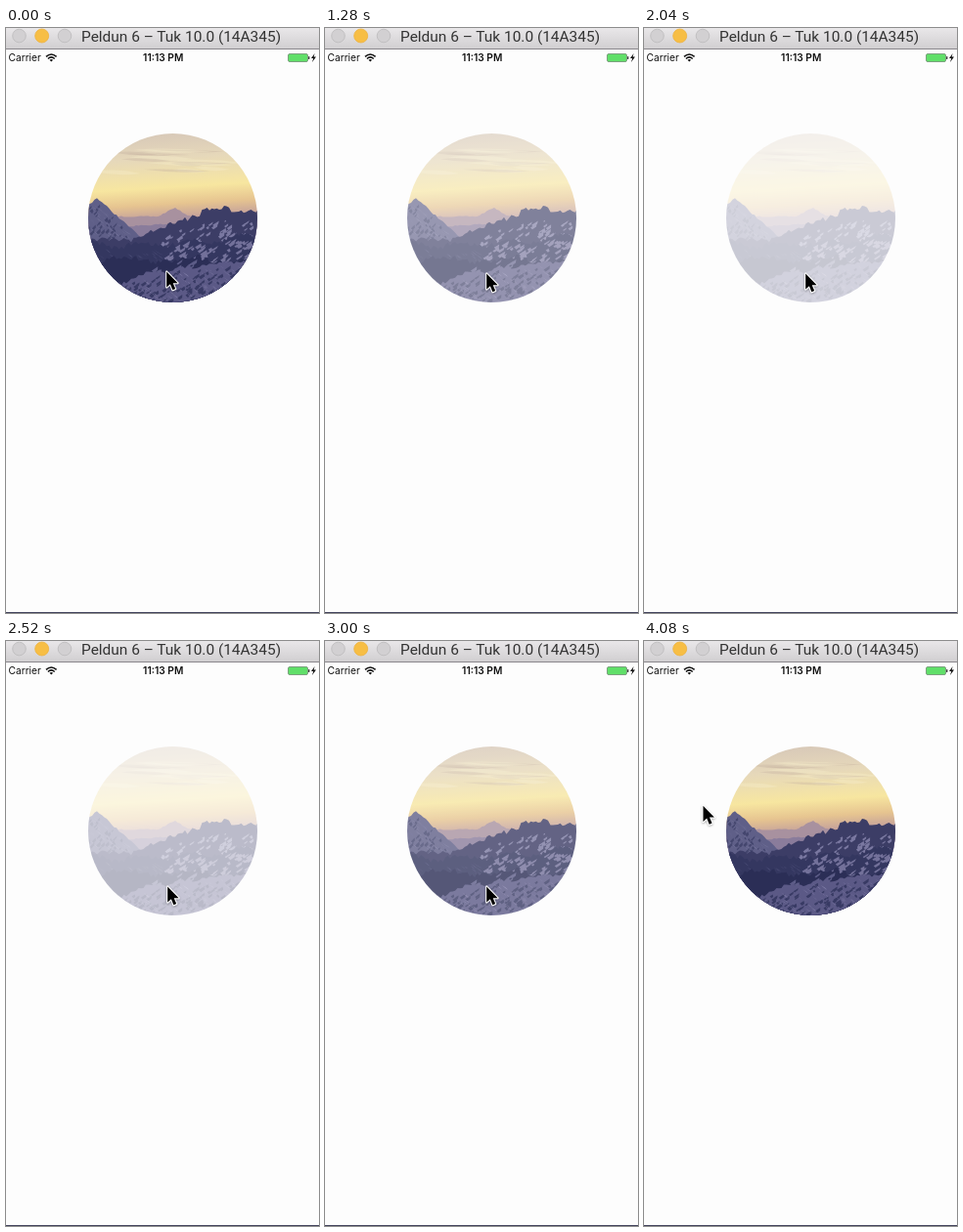
Write an HTML page that moves like this. It is 320x599 px and loops after 4.12 s.

```html
<!DOCTYPE html>
<html lang="en">
<head>
<meta charset="utf-8">
<title>Fading picture</title>
<style>
  html, body { margin: 0; width: 100%; height: 100%; overflow: hidden; background: #fdfdfd; }
  svg { display: block; width: 100%; height: 100%; }
  .title { font: 15.45px Roboto, sans-serif; fill: #333; }
  .status { font: 10.2px Inter, sans-serif; fill: #111; }
  .clock { font-weight: 600; }
</style>
</head>
<body>
<svg viewBox="0 0 320 599" preserveAspectRatio="none">
  <defs>
    <linearGradient id="bar" x2="0" y2="1">
      <stop stop-color="#e9e7e9"/><stop offset="1" stop-color="#d1cfd1"/>
    </linearGradient>
    <linearGradient id="sky" gradientUnits="userSpaceOnUse" x1="166" y1="108" x2="172" y2="208">
      <stop stop-color="#d8c9b8"/>
      <stop offset=".25" stop-color="#e6d8ba"/>
      <stop offset=".55" stop-color="#f7e6a0"/>
      <stop offset=".72" stop-color="#e6c490"/>
      <stop offset=".85" stop-color="#c8a59a"/>
      <stop offset="1" stop-color="#9c8ba3"/>
    </linearGradient>
    <clipPath id="round"><circle cx="170.5" cy="194.5" r="86.5"/></clipPath>
    <filter id="shadow" x="-50%" y="-30%" width="200%" height="170%">
      <feDropShadow dx="0" dy="1" stdDeviation="1" flood-opacity=".35"/>
    </filter>
  </defs>

  <rect width="320" height="599" fill="#fdfdfd"/>
  <rect width="320" height="21" fill="url(#bar)"/>
  <rect y="21" width="320" height="1" fill="#8a878c"/>
  <rect y="598" width="320" height="1" fill="#45465f"/>
  <g fill="#d2d0d2" stroke="#bcbabc" stroke-width=".8">
    <circle cx="13.5" cy="8" r="6.8"/>
    <circle cx="36.7" cy="8" r="7" fill="#f7be45" stroke="#eeb341"/>
    <circle cx="60" cy="8" r="6.8"/>
  </g>
  <text class="title" x="77" y="14">Peldun 6 – Tuk 10.0 (14A345)</text>

  <text class="status" x="2.5" y="34">Carrier</text>
  <g fill="none" stroke="#111" stroke-width="1.6">
    <path d="M41 29.4Q46.3 24.6 51.6 29.4M42.9 31.5Q46.3 28.4 49.7 31.5"/>
    <path d="M46.3 34.6L44.5 32.7Q46.3 31.2 48.1 32.7Z" fill="#111" stroke="none"/>
  </g>
  <text class="status clock" x="160.7" y="34" text-anchor="middle">11:13 PM</text>
  <rect x="288.5" y="26.5" width="20" height="8" rx="1.5" fill="#60df69" stroke="#6f8f72" stroke-width=".8"/>
  <rect x="309" y="29" width="1.4" height="3" rx=".6" fill="#444"/>
  <path d="M315.6 26L312 31H314.2L313 35L317 29.6H314.6Z" fill="#111"/>

  <g id="photo" clip-path="url(#round)">
    <rect x="83" y="107" width="175" height="175" fill="url(#sky)"/>
  </g>

  <path id="cursor" d="M0 0V16.2L3.7 12.8L6.2 18.9L9 17.7L6.5 11.8H11.4Z"
        stroke="#fff" stroke-width="2" stroke-linejoin="round" paint-order="stroke" filter="url(#shadow)"/>
</svg>
<script>
const LOOP = 4120, STEP = 40;
const LEFT = 83, RIGHT = 258, BOTTOM = 285;
const photo = document.getElementById('photo');
const cursor = document.getElementById('cursor');

let seed = 7;
const random = () => (seed = seed * 16807 % 2147483647) / 2147483647;
const between = (low, high) => low + (high - low) * random();
const clamp = v => Math.min(1, Math.max(0, v));
const peak = (x, center, height, slope) => Math.max(0, height - Math.abs(x - center) * slope);

function addPath(d, fill, opacity = 1) {
  const path = document.createElementNS('http://www.w3.org/2000/svg', 'path');
  path.setAttribute('d', d);
  path.setAttribute('fill', fill);
  path.setAttribute('opacity', opacity);
  photo.append(path);
}

// Land below the height top(x), with a jagged edge.
function ridge(top, roughness, fill) {
  let d = `M${LEFT} ${BOTTOM}`;
  for (let x = LEFT; x <= RIGHT; x += 2.5) d += `L${x} ${top(x) + between(-roughness, roughness)}`;
  addPath(`${d}V${BOTTOM}Z`, fill);
}

// Small slanted streaks of snow or rock below top(x).
function streaks(count, from, to, top, depth, slant, fill) {
  let d = '';
  for (let i = 0; i < count; i++) {
    const x = between(from, to), y = top(x) + between(2, depth);
    const length = between(2, 8), width = between(.8, 2.4);
    d += `M${x} ${y}l${length * slant} ${length * .6}l${width} ${width}l${-length * slant * .6} ${-length * .4}Z`;
  }
  addPath(d, fill, .75);
}

// Thin clouds, faint and nearly level.
for (let i = 0; i < 16; i++) {
  const x = between(90, 200), y = between(112, 150), width = between(30, 90);
  addPath(`M${x} ${y}q${width / 2} ${between(-5, 1)} ${width} 2q${-width / 2} ${between(1, 4)} ${-width} -2`,
    i % 2 ? '#c4ae9f' : '#f7edcc', .35);
}

const haze = x => 193 - peak(x, 172, 9, .55);
const leftPeak = x => 215 - peak(x, 93, 41, x < 93 ? .8 : .9);
const rightRange = x => 216 - clamp((x - 128) / 75) * 28
  - peak(x, 207, 4, .5) - peak(x, 223, 5, .6) + Math.sin(x * .55) * 1.5;
const darkSlope = x => 222 - clamp((x - 150) / 100) * 8 + Math.sin(x / 8) * 3;
const valley = x => 237 + Math.sin(x / 11) * 3;
const foreground = x => 262 - clamp((x - 115) / 35) * 12 - clamp((x - 150) / 100) * 13 + Math.sin(x / 6);

ridge(haze, .6, '#a8919f');
ridge(x => 202 + Math.sin(x / 15), .8, '#8a7c9b');

ridge(leftPeak, 1, '#5f5f88');
streaks(60, 84, 128, leftPeak, 32, .8, '#8e8db2');
streaks(45, 84, 125, leftPeak, 32, -.6, '#3b3e66');

ridge(rightRange, 2, '#3c3d66');
streaks(60, 160, 256, x => rightRange(x) + 8, 22, -.9, '#8f8cb4');

ridge(darkSlope, 2.5, '#343760');
streaks(45, 84, 165, darkSlope, 20, .9, '#5e5f8a');
streaks(85, 168, 256, darkSlope, 22, -1, '#8884ae');

ridge(valley, 3, '#2b2e56');
streaks(50, 150, 256, valley, 18, -.9, '#6d6b97');

ridge(foreground, 2, '#5b5986');
streaks(130, 105, 250, foreground, 32, -.9, '#2d3059');
streaks(110, 118, 250, foreground, 30, .9, '#9591ba');
ridge(x => 250 + (x - 88) * .55, 2, '#2a2d54');

const smooth = u => u * u * (3 - 2 * u);
const progress = (t, from, to) => smooth(clamp((t - from) / (to - from)));
const start = performance.now();

function frame() {
  const t = Math.floor((performance.now() - start) % LOOP / STEP) * STEP;
  const dim = progress(t, 920, 1660) - progress(t, 2300, 3360);
  photo.setAttribute('opacity', 1 - .74 * dim);

  const settle = progress(t, 440, 760), press = progress(t, 800, 960), leave = progress(t, 3600, 4080);
  const x = 164.2 + press - 104.7 * leave;
  const y = 249.4 + 1.5 * settle + .5 * press - 82.6 * leave;
  cursor.setAttribute('transform', `translate(${x} ${y})`);
  requestAnimationFrame(frame);
}
frame();
</script>
</body>
</html>
```
